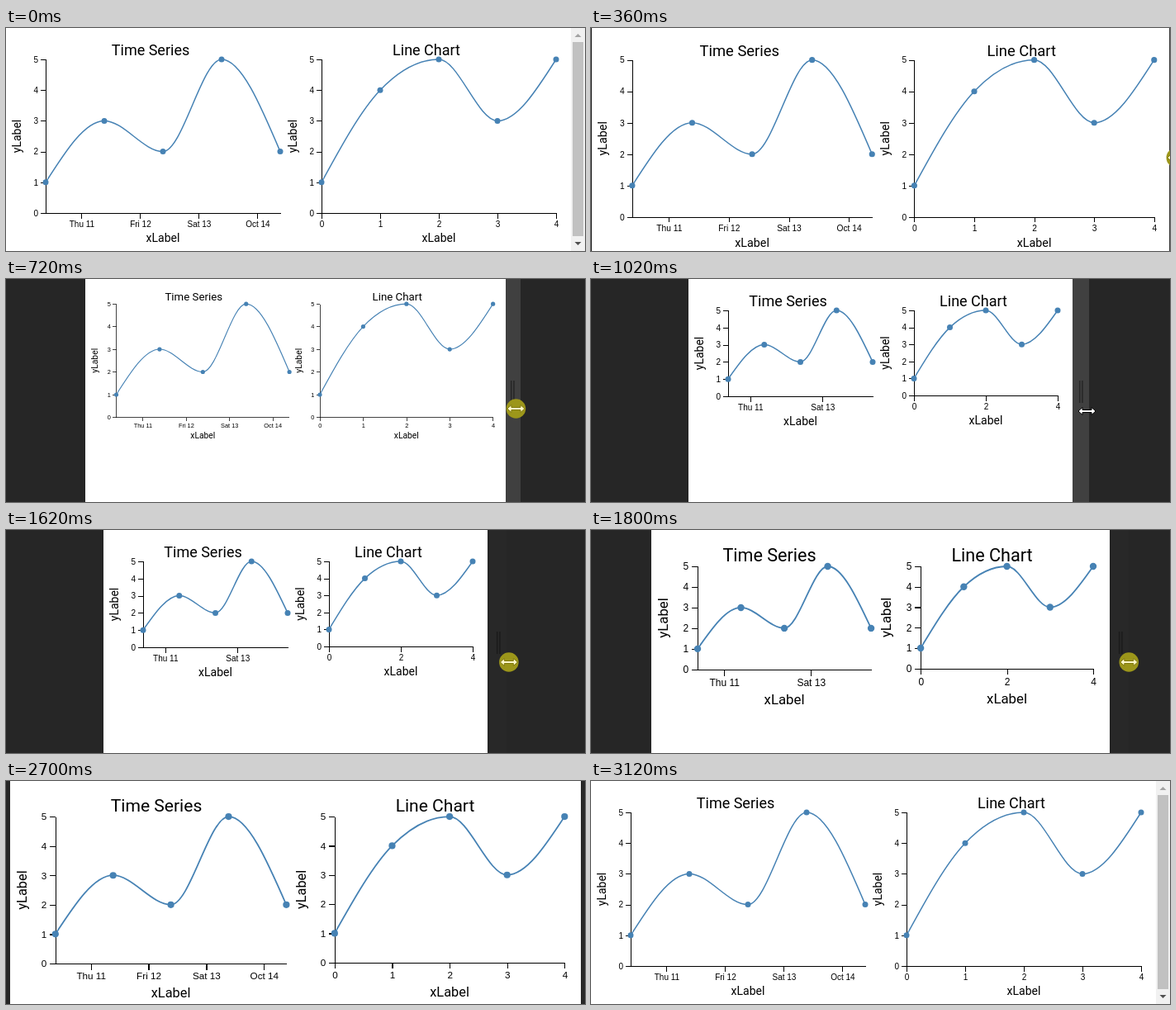
Write an HTML page that moves like this. It is 701 by 270 pixels and loops after 3600 ms.

```html
<!DOCTYPE html>
<html lang="en">
<head>
<meta charset="utf-8">
<title>Responsive charts</title>
<style>
  html, body { margin: 0; width: 100%; height: 100%; overflow: hidden; background: #262626; }
  svg { display: block; width: 100%; height: 100%; }
  text { text-anchor: middle; font: 14px Roboto, sans-serif; }
  .title { font-size: 18px; }
  .tick { font: 10px "Liberation Sans", Arial, sans-serif; }
  .y { text-anchor: end; }
  .axis { fill: none; stroke: #000; shape-rendering: crispEdges; }
  .line { fill: none; stroke: #4682b4; stroke-width: 1.5; }
  circle { fill: #4682b4; }
  #disc { fill: #9c961a; }
</style>
</head>
<body>
<svg viewBox="0 0 701 270">
  <g id="handle">
    <rect id="bar" width="20" height="270"/>
    <path id="grip" d="M8.7 123v27M11.9 123v27" stroke-width="1.5"/>
  </g>
  <rect id="page" height="270" fill="#fff"/>
  <g id="charts"></g>
  <g id="scrollbar">
    <rect x="684" width="17" height="270" fill="#f1f1f1"/>
    <rect x="686" y="17" width="13" height="235" fill="#c1c1c1"/>
    <path d="M688.5 11l4-4 4 4z" fill="#a3a3a3"/>
    <path d="M688.5 259l4 4 4-4z" fill="#505050"/>
  </g>
  <g id="cursor">
    <circle id="disc" r="11.8"/>
    <path id="arrow" d="M-10.5 0l5-4.5v3h11v-3l5 4.5-5 4.5v-3h-11v3z"/>
  </g>
</svg>
<script>
const STAGE = 701, LOOP = 3600, STEP = 60, PAD = 8, SCROLLBAR = 17;
const MARGIN = { left: 40, right: 10, top: 30, bottom: 35 };

// Each drag moves both page edges to a new inset; the charts are redrawn on release.
const drags = [
  { press: 300, start: 357, end: 957, release: 1020, inset: 118 },
  { press: 1620, start: 1620, end: 1980, release: 2040, inset: 54 },
  { press: 2460, start: 2490, end: 2781, release: 3000, inset: 0 }
];

const el = id => document.getElementById(id);
const set = (id, attributes) => {
  for (const name in attributes) el(id).setAttribute(name, attributes[name]);
};
const easeOut = p => Math.sin(Math.min(Math.max(p, 0), 1) * Math.PI / 2);

const insetAt = t => drags.reduce(
  (inset, d) => inset + (d.inset - inset) * easeOut((t - d.start) / (d.end - d.start)), 0);

const bodyWidth = (inset, scrolling) =>
  STAGE - 2 * inset - 2 * PAD - (scrolling ? SCROLLBAR : 0);

function layoutWidth(t) {
  const inset = drags.reduce((last, d) => t >= d.release ? d.inset : last, 0);
  return bodyWidth(inset, inset === 0);
}

// Monotone cubic through evenly spaced points
function curve(points) {
  const h = points[1][0] - points[0][0];
  const s = points.slice(1).map((p, i) => (p[1] - points[i][1]) / h);
  const m = points.map((_, i) => {
    const a = s[i - 1], b = s[i];
    return (Math.sign(a) + Math.sign(b)) * Math.min(Math.abs(a), Math.abs(b), Math.abs(a + b) / 4);
  });
  const n = points.length - 1;
  m[0] = (3 * s[0] - m[1]) / 2;
  m[n] = (3 * s[n - 1] - m[n - 1]) / 2;
  return points.map(([x, y], i) => {
    if (!i) return `M${x},${y}`;
    const [px, py] = points[i - 1];
    return `C${px + h / 3},${py + m[i - 1] * h / 3} ${x - h / 3},${y - m[i] * h / 3} ${x},${y}`;
  }).join("");
}

function chart(left, outerWidth, title, values, labels, tickStart) {
  const w = outerWidth - MARGIN.left - MARGIN.right;
  const h = Math.round(outerWidth * .75 - MARGIN.top - MARGIN.bottom);
  const points = values.map((v, i) => [i * w / 4, h * (1 - v / 5)]);
  let axis = `M.5 .5V${h + .5}H${w + .5}`, text = "";
  for (let v = 0; v <= 5; v++) {
    const y = h * (1 - v / 5) + .5;
    axis += `M-6 ${y}H.5`;
    text += `<text class="tick y" x="-9" y="${y + 3.2}">${v}</text>`;
  }
  const every = outerWidth < 250 ? 2 : 1;
  labels.forEach((label, i) => {
    if (i % every) return;
    const x = (tickStart + i / 4) * w + .5;
    axis += `M${x} ${h + .5}v6`;
    text += `<text class="tick" x="${x}" y="${h + 16.6}">${label}</text>`;
  });
  return `<g transform="translate(${left + MARGIN.left} ${MARGIN.top})">
    <path class="axis" d="${axis}"/>${text}
    <path class="line" d="${curve(points)}"/>
    ${points.map(([x, y]) => `<circle cx="${x}" cy="${y}" r="3.5"/>`).join("")}
    <text class="title" x="${outerWidth / 2 - MARGIN.left}" y="-5">${title}</text>
    <text x="${w / 2}" y="${h + 35}">xLabel</text>
    <text transform="translate(-30 ${h / 2}) rotate(-90)">yLabel</text></g>`;
}

let drawnWidth;
function drawCharts(width) {
  if (width === drawnWidth) return;
  drawnWidth = width;
  const first = Math.ceil(width / 2);
  el("charts").innerHTML =
    chart(0, first, "Time Series", [1, 3, 2, 5, 2], ["Thu 11", "Fri 12", "Sat 13", "Oct 14"], .153) +
    chart(first, width - first, "Line Chart", [1, 4, 5, 3, 5], [0, 1, 2, 3, 4], 0);
}

function render(t) {
  const inset = Math.round(insetAt(t));
  const scrolling = t < 360 || t >= 2940;
  const pressed = drags.some(d => t >= d.press && t < d.release);

  // Between redraws the charts only stretch with the page
  const width = layoutWidth(t);
  drawCharts(width);
  const scale = bodyWidth(inset, scrolling) / width;
  set("charts", { transform: `translate(${inset + PAD} ${PAD}) scale(${scale})` });
  set("page", { x: inset, width: STAGE - 2 * inset });
  set("scrollbar", { display: scrolling ? "inline" : "none" });

  // The cursor leads the handle, which leads the page edge
  const handleInset = insetAt(t + 12);
  const outrun = handleInset < insetAt(t) - .1;
  set("handle", { transform: `translate(${Math.round(STAGE - handleInset)})` });
  set("bar", { fill: outrun ? "#282828" : "#404040" });
  set("grip", { stroke: outrun ? "#1b1b1b" : "#262626" });

  const grab = t < 2280 ? 17.5 : 15;
  set("cursor", { transform: `translate(${STAGE - insetAt(t + 30) + grab} ${t < 840 ? 157 : 160})` });
  set("disc", { display: pressed ? "inline" : "none" });
  set("arrow", { fill: pressed ? "#fff8c8" : "#fff", stroke: pressed ? "#80790f" : "#000" });
}

const start = performance.now();
function tick() {
  const t = (performance.now() - start) % LOOP;
  render(Math.floor(t / STEP) * STEP);
  requestAnimationFrame(tick);
}
tick();
</script>
</body>
</html>
```
